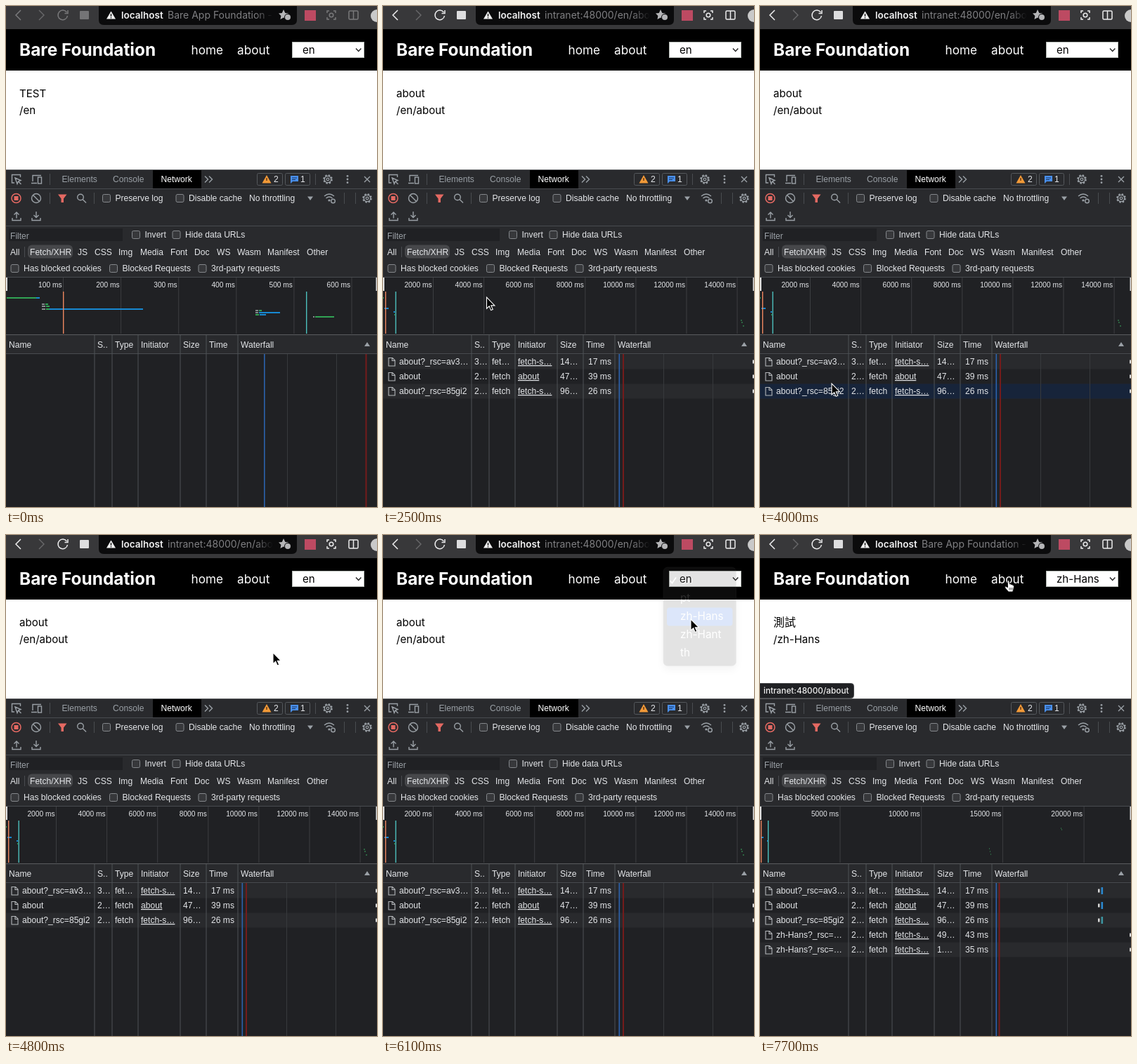
Recreate the animation shown at these times as an HTML page. Size 528x714 px, loop 8 s.

```html
<!DOCTYPE html>
<html lang="en">
<head>
<meta charset="utf-8">
<title>Route and locale demo</title>
<style>
  html, body { margin: 0; width: 100%; height: 100%; overflow: hidden; background: #202124; }
  svg { display: block; width: 100vw; height: 100vh; }
  text { font: 12.1px "Liberation Sans", Arial, sans-serif; fill: #e4e6e9; white-space: pre; }
  .ui { font-family: Inter, "Noto Sans CJK TC", "Noto Sans CJK", sans-serif; }
  .tick { font-size: 10.2px; text-anchor: end; }
  .link { text-decoration: underline; }
  .icon { fill: none; stroke: #9aa0a6; stroke-width: 1.4; }
</style>
</head>
<body>
<svg id="stage" viewBox="0 0 528 714"></svg>
<script>
const LOOP = 8000, STEP = 100, ROW_TOP = 496.5, ROW_H = 21;
const BORDER = '#494c50', PANEL = '#292a2d', TABLE = '#202124';

const rect = (x, y, w, h, fill, extra = '') =>
  `<rect x="${x}" y="${y}" width="${w}" height="${h}" fill="${fill}" ${extra}/>`;
const text = (x, y, s, extra = '') => `<text x="${x}" y="${y}" ${extra}>${s}</text>`;
const ui = (x, y, s, size, fill, weight = 400) =>
  text(x, y, s, `class="ui" style="font-size:${size}px;font-weight:${weight};fill:${fill}"`);
const icon = (d, extra = '') => `<path class="icon" d="${d}" ${extra}/>`;
const shape = (d, fill) => `<path d="${d}" fill="${fill}"/>`;
const circle = (x, y, r, fill, extra = '') => `<circle cx="${x}" cy="${y}" r="${r}" fill="${fill}" ${extra}/>`;
const vline = (x, y1, y2, color, w = 1) => rect(x, y1, w, y2 - y1, color);
const hline = (y, color = BORDER) => rect(0, y, 528, 1, color);
const group = (id, body, extra = '') => `<g id="${id}" ${extra}>${body}</g>`;
const gear = (x, y) => circle(x, y, 5.6, 'none', 'stroke="#9aa0a6" stroke-width="2.4" stroke-dasharray="2.4 2"') +
  circle(x, y, 4.6, 'none', 'stroke="#9aa0a6" stroke-width="1.3"') +
  circle(x, y, 1.8, 'none', 'stroke="#9aa0a6" stroke-width="1.3"');
const check = (x, y, label) =>
  rect(x, y - 5.5, 11, 11, '#37383b', 'rx="2" stroke="#85888c"') + text(x + 18, y + 4, label);

function browserBar() {
  return rect(0, 0, 528, 33, '#38383a') +
    shape('M132 0H414V20Q414 27 407 27H139Q132 27 132 20Z', '#0b0b0c') +
    icon('M47 6L54 13L47 20', 'style="stroke:#69696b"') +
    group('nav',
      '<path d="M21 6L14 13L21 20"/><path d="M86.5 9.2A6.8 6.8 0 1 0 87.5 14"/><path d="M88 6V10.5H83.5"/>' +
      '<path d="M457 10V7H460M466 7H469V10M469 16V19H466M460 19H457V16"/><circle cx="463" cy="13" r="2.8"/>' +
      '<rect x="488" y="7" width="13" height="12" rx="1.5"/><path d="M494.5 7V19"/>',
      'fill="none" stroke-width="1.5"') +
    rect(105, 7, 13, 12, 'currentColor', 'id="tile" rx="1"') +
    shape('M149.5 7.5L156 18.5H143Z', '#f2f2f2') + rect(148.8, 11, 1.4, 4, '#111') + rect(148.8, 16, 1.4, 1.4, '#111') +
    ui(164, 17.5, 'localhost', 13.5, '#f1f1f2', 600) +
    shape('M395 5L397.4 10 402 10.5 398.5 14 399.5 19 395 16.5 390.5 19 391.4 14 388 10.5 392.8 10Z', '#b5b5b7') +
    circle(401, 16, 5, '#0b0b0c') + circle(401, 16, 4, '#b5b5b7') +
    rect(425, 6, 16, 15, '#bd4a62') + circle(528, 14, 9, '#c9c9c9');
}

function page() {
  return rect(0, 33, 528, 59, '#000') + rect(0, 92, 528, 142, '#fff') +
    ui(19, 71, 'Bare Foundation', 24.4, '#fff', 700) +
    ui(263.5, 68.5, 'home', 17.2, '#fff') + ui(329, 68.5, 'about', 17.2, '#fff') +
    rect(407.5, 51.5, 102, 22, '#fff', 'stroke="#b5bab5"') +
    icon('M498 60.5L501.7 64.5L505.4 60.5', 'style="stroke:#222"');
}

function toolbars() {
  const types = [['All', 6], ['Fetch/XHR', 34], ['JS', 102], ['CSS', 126], ['Img', 160], ['Media', 191],
    ['Font', 234], ['Doc', 268], ['WS', 300], ['Wasm', 329], ['Manifest', 372], ['Other', 428]];
  const dim = 'style="fill:#9aa0a6"';
  const badge = (x, w) => rect(x, 238.5, w, 17, 'none', 'rx="2" stroke="#55595d"');
  return rect(0, 234, 528, 480, PANEL) + hline(233, '#5a5c5f') + hline(260) +
    icon('M12 252H8.5V240.5H20.5V244M13 245L21 248.5L17.5 250L16 253.5ZM17.5 250L21.5 254') +
    icon('M38 250V241.5H50M36 252.5H44') + rect(45.5, 244, 5, 9, 'none', 'stroke="#9aa0a6" stroke-width="1.4"') +
    vline(62, 239, 255, BORDER) +
    text(79.5, 251, 'Elements', dim) + text(152, 251, 'Console', dim) +
    rect(209, 234, 69, 26, '#000') + text(220.5, 251, 'Network', 'style="fill:#fff"') +
    icon('M283 242.5L287.5 247L283 251.5M289 242.5L293.5 247L289 251.5') +
    badge(357.5, 36) + shape('M371 241L377.5 252.5H364.5Z', '#f29a38') + rect(370.4, 245, 1.2, 4, '#42210b') +
    text(381, 251, '2') + badge(397.5, 35) +
    shape('M405 242H416V250H408L405 253Z', '#4a90ec') + rect(407, 244.5, 7, 1, '#15335f') + rect(407, 247, 5, 1, '#15335f') +
    text(419, 251, '1') + vline(440, 239, 255, BORDER) + gear(458, 247) +
    [242.3, 247, 251.7].map(y => circle(486, y, 1.4, '#9aa0a6')).join('') +
    icon('M510 243L518 251M518 243L510 251') +
    circle(14.5, 274, 6.5, 'none', 'stroke="#e46962" stroke-width="1.5"') + rect(11.5, 271, 6, 6, '#e46962') +
    circle(43, 274, 6.5, 'none', 'class="icon"') + icon('M38.5 269.5L47.5 278.5') +
    vline(62, 266, 282, BORDER) + shape('M74 268.5H86.5L82 274.5V280H78.5V274.5Z', '#e46962') +
    circle(106, 272.5, 4.3, 'none', 'class="icon"') + icon('M109 275.5L114 280.5') + vline(125, 266, 282, BORDER) +
    check(137.5, 274, 'Preserve log') + check(242, 274, 'Disable cache') + text(346, 278, 'No throttling') +
    shape('M429 271.5H437L433 277Z', '#9aa0a6') +
    icon('M453 271Q460 265 467 271M455.5 274Q460 270 464.5 274') + circle(460, 277, 1.6, '#9aa0a6') +
    circle(465.5, 278, 2.8, 'none', 'class="icon"') +
    vline(481, 266, 282, BORDER) + vline(497, 266, 282, BORDER) + gear(514, 274) +
    icon('M15 302.5V294M11.5 297.5L15 294L18.5 297.5M9 302V305.5H21V302') +
    icon('M43 293V301.5M39.5 298L43 301.5L46.5 298M37 302V305.5H49V302') +
    hline(313) + rect(4, 317, 162, 18, TABLE) + text(6, 331.5, 'Filter', dim) +
    check(179.5, 326, 'Invert') + check(237, 326, 'Hide data URLs') +
    vline(26, 343, 358, BORDER) + rect(31, 340.5, 64, 19, '#46474a', 'rx="6"') +
    types.map(([s, x]) => text(x, 354.5, s)).join('') +
    check(7, 374, 'Has blocked cookies') + check(147.5, 374, 'Blocked Requests') + check(274, 374, '3rd-party requests') +
    hline(386) + rect(0, 387, 528, 81, TABLE) + rect(0, 468, 528, 28, PANEL) + hline(468, '#5a5c5f') + hline(495) +
    rect(0, 496, 528, 218, TABLE);
}

function overview(first, gap, unit, lines, bars) {
  let out = '';
  for (let k = 1, x = first; x < 528; k++, x += gap) {
    out += vline(x - 0.5, 387, 467, '#3c3e41') + text(x - 2, 401, k * unit + ' ms', 'class="tick"');
  }
  return out + bars.map(([x, y, w, c]) => rect(x, y, w, 2, c)).join('') +
    vline(lines[0], 407, 467, '#ee875f', 1.4) + vline(lines[1], 407, 467, '#4cc0bd', 1.4) +
    vline(0, 387, 406, '#ddd', 2) + vline(526.5, 387, 406, '#ddd', 1.5);
}

const columns = [['Name', 4], ['S..', 130], ['Type', 155], ['Initiator', 192], ['Size', 252], ['Time', 289], ['Waterfall', 334]];
const cells = [23, 130, 155, 192, 252, 292];
const requests = [
  ['about?_rsc=av3…', '3…', 'fet…', 'fetch-s…', '14…', '17 ms'],
  ['about', '2…', 'fetch', 'about', '47…', '39 ms'],
  ['about?_rsc=85gi2', '2…', 'fetch', 'fetch-s…', '96…', '26 ms'],
  ['zh-Hans?_rsc=…', '2…', 'fetch', 'fetch-s…', '49…', '43 ms'],
  ['zh-Hans?_rsc=…', '2…', 'fetch', 'fetch-s…', '1.…', '35 ms']];

const stripes = n => requests.slice(0, n).map((_, i) =>
  i % 2 ? '' : rect(0, ROW_TOP + i * ROW_H, 528, ROW_H, PANEL)).join('');

const tableRows = (n, oldMarks) => requests.slice(0, n).map((row, i) => {
  const y = ROW_TOP + i * ROW_H + 10.5;
  const mark = oldMarks && i < 3
    ? rect(481, y - 2.5, 2.5, 5, '#d8d8d8') + rect(485.5, y - 5, 2.6, 10, i === 2 ? '#3c94a0' : '#2a88cf')
    : rect(526, y - 2.5, 2, 5, '#d8d8d8');
  return icon(`M8 ${y - 5.5}H13.5L17 ${y - 2}V${y + 6}H8ZM13 ${y - 5.5}V${y - 1.5}H17`, 'style="stroke:#b4b7ba;stroke-width:1.1"') +
    row.map((s, c) => text(cells[c], y + 4, s, c === 3 ? 'class="link"' : '')).join('') + mark;
}).join('');

const waterfall = (grid, blue, red) => grid.map(x => vline(x, 496, 714, '#37393c')).join('') +
  vline(blue, 496, 714, '#2c62ad', 1.6) + vline(red, 496, 714, '#741b1b', 2);

const G = '#31a354', B = '#1789d2', W = '#85898d';
const views = {
  home: {
    tab: 'Bare App Foundation -', lines: ['TEST', '/en'], locale: 'en', rows: 0,
    chart: overview(81.5, 82.1, 100, [81, 427], [
      [1, 415, 42, G], [43, 415, 5, B], [51, 424, 4, W], [56, 424, 4, G], [51, 427, 5, W], [57, 427, 5, G],
      [51, 431, 5, W], [57, 431, 5, G], [62, 431, 133, B], [355, 433, 4, W], [360, 433, 4, G],
      [355, 436, 4, W], [360, 436, 30, B], [355, 439, 5, G], [361, 439, 9, B], [437, 442, 2, W], [440, 442, 27, G]]),
    fall: waterfall([400, 470], 367, 511.5)
  },
  about: {
    tab: 'intranet:48000/en/abo', lines: ['about', '/en/about'], locale: 'en', rows: 3,
    chart: overview(71.5, 72.1, 2000, [3, 17.5], [
      [0, 415, 1, G], [2, 430, 6, B], [15, 435, 2, B], [16, 439, 1, G], [509, 447, 2, '#2d6542'],
      [510, 450, 2, '#2d6542'], [512, 455, 2, '#2d6542']]),
    fall: waterfall([399, 469], 335.5, 341)
  },
  zh: {
    tab: 'Bare App Foundation -', lines: ['測試', '/zh-Hans'], locale: 'zh-Hans', rows: 5,
    chart: overview(114, 115.7, 5000, [1, 11], [
      [2, 430, 3, B], [10, 435, 2, B], [326, 446, 1, '#2d6542'], [327, 450, 1, '#2d6542'], [328, 454, 1, '#2d6542'],
      [428, 417, 1, '#2d6542'], [429, 419, 1, '#2d6542']]),
    fall: waterfall([437], 335.5, 339.5)
  }
};

const view = (id, v) => group(id,
  `<g mask="url(#fade)">${ui(230, 17.5, v.tab, 14, '#7f7f82')}</g>` +
  ui(19, 129.5, v.lines[0], id === 'zh' ? 16 : 15.1, '#000') + ui(19, 153.5, v.lines[1], 15.1, '#000') +
  ui(422, 68, v.locale, 15.1, '#000') + v.chart + v.fall + tableRows(v.rows, id === 'zh'));

function popup() {
  return rect(399, 46, 103.5, 140.5, 'rgba(81,82,82,.885)', 'rx="6" stroke="#858585" stroke-opacity=".6"') +
    rect(404, 52, 93.5, 26, '#3473e4', 'id="choice" rx="4"') +
    icon('M408.5 65L411.5 68.5L417 60.5', 'style="stroke:#fff;stroke-width:1.7"') +
    ['en', 'pt', 'zh-Hans', 'zh-Hant', 'th'].map((s, i) => ui(423, 69 + 26 * i, s, 15.3, '#fff')).join('');
}

const bubble = rect(-5, 211.5, 138.5, 21, '#202124', 'rx="4" stroke="#4b4c4f"') +
  ui(5, 226.3, 'intranet:48000/about', 11.8, '#f0f0f0', 500);
const arrow = '<path d="M0 0V16L3.7 12.6L6.2 18.4L8.8 17.3L6.3 11.7H11.4Z" fill="#000" stroke="#fff" stroke-width="1.1"/>';
const hand = '<path d="M4.2 1.5Q5.8 -.3 6.8 1.8L7.4 6Q9 5 9.7 6.7Q11.3 6 11.8 7.6Q13.6 7.3 13.6 9.2L12.8 13.4L11.7 17H5.6L1.2 11.8Q-.2 9.6 1.6 9.2L4.5 10.6Z" fill="#fff" stroke="#111" stroke-width="1"/>' +
  '<path d="M7 11V14.5M9 11V14.5M11 11V14.5" stroke="#333" stroke-width=".8"/>';

document.getElementById('stage').innerHTML =
  '<defs><linearGradient id="ramp" gradientUnits="userSpaceOnUse" x1="355" x2="380" y1="0" y2="0">' +
  '<stop stop-color="#fff"/><stop offset="1" stop-color="#000"/></linearGradient>' +
  '<mask id="fade" maskUnits="userSpaceOnUse" x="225" y="0" width="160" height="30">' +
  rect(225, 0, 160, 30, 'url(#ramp)') + '</mask></defs>' +
  browserBar() + page() + toolbars() + group('stripes3', stripes(3)) + group('stripes5', stripes(5)) +
  rect(0, 0, 528, ROW_H, '#17243a', 'id="hover"') +
  Object.entries(views).map(([id, v]) => view(id, v)).join('') +
  columns.map(([s, x]) => text(x, 486.5, s)).join('') +
  columns.slice(1).map(([, x]) => vline(x - 4.5, 469, 714, '#4f5256')).join('') +
  shape('M510 485H518L514 479Z', '#9aa0a6') +
  group('bubble', bubble) +
  group('popup', popup(), 'style="filter:drop-shadow(0 5px 6px rgba(0,0,0,.3))"') +
  group('pointer', group('arrow', arrow) + group('hand', hand));

// Pointer path: time, x, y
const track = [[200, 431, 430], [300, 281, 225], [400, 281, 225], [1000, 356, 62], [1100, 356, 62], [1400, 350, 65],
  [1900, 350, 65], [2700, 110, 480], [2900, 74, 564], [3100, 57, 534], [3600, 88, 526], [4000, 102, 538],
  [4100, 102, 538], [4300, 125, 563], [5000, 443, 70], [5200, 443, 74], [5400, 443, 103], [5600, 442, 124],
  [5900, 438, 120], [6100, 438, 120], [6400, 389, 147], [6600, 389, 147], [7300, 348, 64], [LOOP, 348, 64]];

function pointerAt(t) {
  const i = track.findIndex(k => k[0] > t);
  if (i <= 0) return track[0].slice(1);
  const [t0, x0, y0] = track[i - 1], [t1, x1, y1] = track[i];
  const u = (t - t0) / (t1 - t0), e = u * u * (3 - 2 * u);
  return [x0 + (x1 - x0) * e, y0 + (y1 - y0) * e];
}

const $ = id => document.getElementById(id);
const show = (id, on) => { $(id).style.display = on ? '' : 'none'; };
const within = (t, a, b) => t >= a && t < b;

function render(now) {
  const t = Math.floor((now % LOOP) / STEP) * STEP;
  const current = t < 2000 ? 'home' : t < 6300 ? 'about' : 'zh';
  Object.keys(views).forEach(id => show(id, id === current));
  show('stripes3', current === 'about');
  show('stripes5', current === 'zh');

  const active = t >= 1200;
  $('nav').setAttribute('stroke', active ? '#ececed' : '#79797b');
  $('tile').style.color = active ? '#dededf' : '#747476';

  const [x, y] = pointerAt(t);
  const overLink = within(t, 1200, 2000) || t >= 7200;
  show('pointer', t >= 200);
  show('hand', overLink);
  show('arrow', !overLink);
  $('pointer').setAttribute('transform', `translate(${x.toFixed(1)} ${y.toFixed(1)})`);

  // Row highlighting trails the pointer by one step.
  const row = Math.floor((pointerAt(t - STEP)[1] + 4 - ROW_TOP) / ROW_H);
  show('hover', within(t, 2600, 4700) && row >= 0 && row < 3);
  $('hover').setAttribute('y', ROW_TOP + row * ROW_H);

  const start = t < 4000 ? 1600 : 7600;
  show('bubble', within(t, 1600, 2100) || t >= 7600);
  $('bubble').style.opacity = t < start + STEP ? 0.5 : 1;

  show('popup', within(t, 5100, 6200));
  $('popup').style.opacity = t < 6000 ? 1 : t < 6100 ? 0.6 : 0.17;
  const choice = Math.max(0, Math.min(4, Math.floor((y - 52) / 26)));
  $('choice').setAttribute('y', 51.5 + 26 * choice);
}

const began = performance.now();
(function tick() {
  render(performance.now() - began);
  requestAnimationFrame(tick);
})();
</script>
</body>
</html>
```
